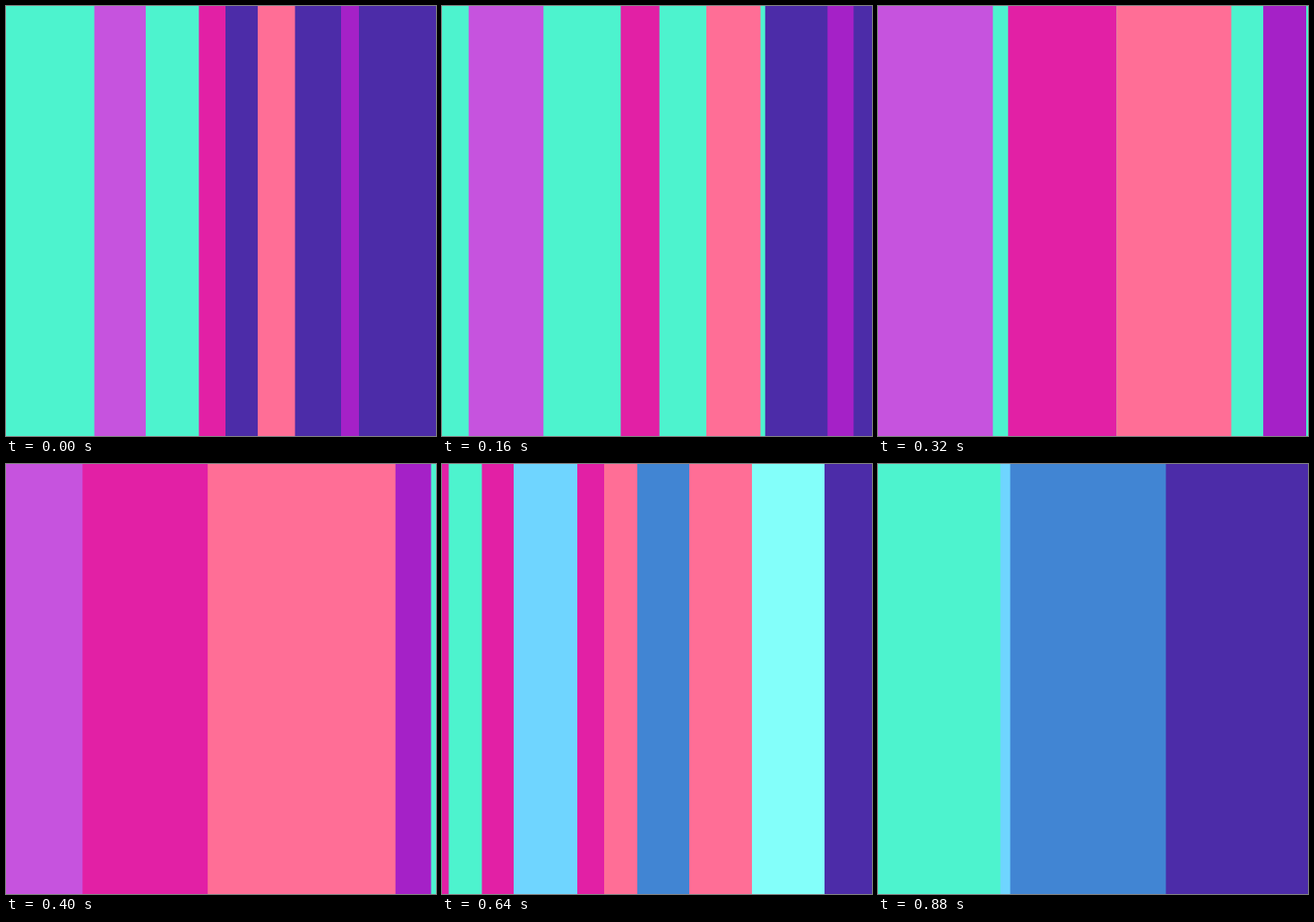
Write an HTML page with a canvas that moves like this. It is 480 by 480 pixels and loops after 0.96 s.

```html
<!DOCTYPE html>
<html lang="en">
<head>
<meta charset="utf-8">
<title>Stripes</title>
<style>
  html, body { margin: 0; width: 100%; height: 100%; overflow: hidden; }
  canvas { display: block; width: 100vw; height: 100vh; }
</style>
</head>
<body>
<canvas id="stage" width="480" height="480"></canvas>
<script>
const SIZE = 480, STEP = 80, STEPS = 12;
const ctx = document.getElementById('stage').getContext('2d');

const teal = '#4df3ce', indigo = '#4c2ca8', magenta = '#e220a5', coral = '#ff6e96';
const orchid = '#c653de', violet = '#a521c7', sky = '#6fd5ff', blue = '#4185d3', aqua = '#83fffa';

// Zooming bars: colour, left, right, growth of each side
const zoomBars = [
  [orchid, 98.6, 156, 0, 35],
  [magenta, 215.3, 245, 44.5, 28],
  [violet, 374, 394, 18, -2.6],
  [coral, 281, 322.6, 30.5, 30]
];

// Opening bars: colour, centre, half width, growth
const openBars = [
  [sky, 115.5, 23.5, 12],
  [aqua, 386.5, 28.5, 12],
  [blue, 247, 17, 12],
  [teal, 26, 2.8, 15.7],
  [indigo, SIZE, 35, 18]
];

function bar(color, left, right) {
  ctx.fillStyle = color;
  ctx.fillRect(left, 0, right - left, SIZE);
}

// Zoom with a slight drift for three steps, then each bar widens on its own.
function zoomScene(n) {
  const z = Math.min(n, 3);
  const scale = 1 + 0.262 * z ** 0.795;
  const drift = 1.35 * z * (3 - z);
  const grow = (n - z) ** 1.23;
  const place = x => 256 + (x - 256) * scale + drift;
  bar(indigo, 0, SIZE);
  bar(teal, 0, 225 + 48 * n ** 1.5);
  for (const [color, left, right, growLeft, growRight] of zoomBars) {
    bar(color, place(left) - growLeft * grow, place(right) + growRight * grow);
  }
}

// Two halves rest for one step, then bars open from their centres.
function openScene(n) {
  bar(magenta, 0, SIZE);
  bar(coral, 181, SIZE);
  if (n < 1) return;
  for (const [color, centre, half, growth] of openBars) {
    const reach = half + growth * (n - 1) ** 1.39;
    bar(color, centre - reach, centre + reach);
  }
}

function draw(time) {
  const step = Math.floor(time / STEP) % STEPS;
  if (step < 6) zoomScene(step);
  else openScene(step - 6);
}

const start = performance.now();
function tick() {
  draw(performance.now() - start);
  requestAnimationFrame(tick);
}
tick();
</script>
</body>
</html>
```
